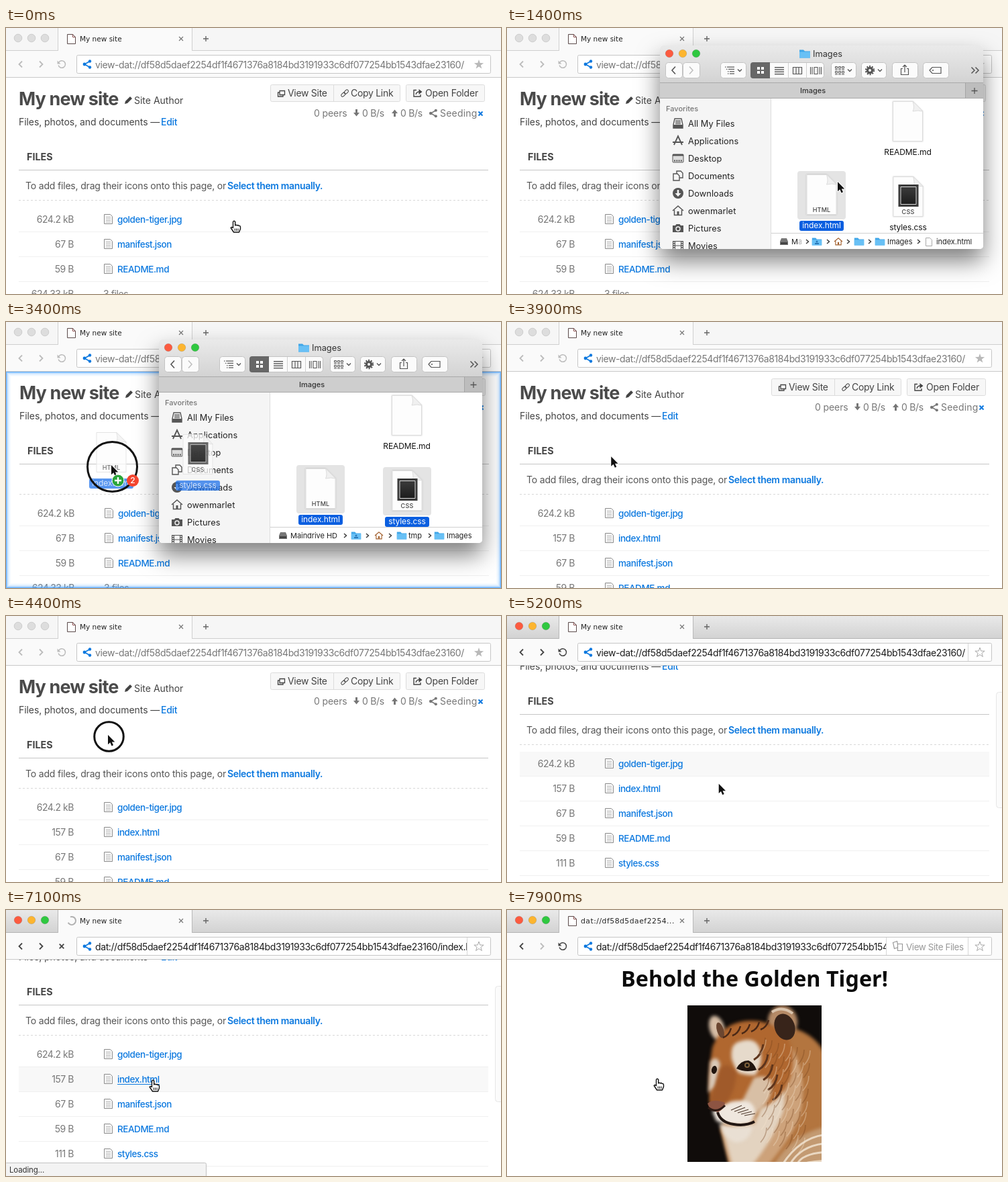
An HTML page with a canvas for the animation above (8 s loop, 738 by 396 pixels).

```html
<!DOCTYPE html>
<html lang="en">
<head>
<meta charset="utf-8">
<title>My new site</title>
<style>
html, body { margin: 0; width: 100%; height: 100%; overflow: hidden; background: #fff; }
canvas { display: block; width: 738px; height: 396px; }
</style>
</head>
<body>
<canvas id="stage"></canvas>
<script>
const W = 738, H = 396, LOOP = 8000, STEP = 100;
const canvas = document.getElementById('stage');
const dpr = window.devicePixelRatio || 1;
canvas.width = W * dpr;
canvas.height = H * dpr;
const c = canvas.getContext('2d');

const UI = 'Inter, "Noto Sans", sans-serif';
const TAB = '"DejaVu Sans", sans-serif';
const BLUE = '#0b78df';
const HASH = 'df58d5daef2254df1f4671376a8184bd3191933c6df077254bb1543dfae23160';

// ---------- helpers ----------
function text(s, x, y, size, color, o = {}) {
  c.font = `${o.weight || 400} ${size}px ${o.family || UI}`;
  c.letterSpacing = (o.track || 0) + 'px';
  c.textAlign = o.align || 'left';
  c.fillStyle = color;
  c.fillText(s, x, y);
}
function rect(x, y, w, h, fill) { c.fillStyle = fill; c.fillRect(x, y, w, h); }
function round(x, y, w, h, r, fill, stroke) {
  c.beginPath();
  c.roundRect(x, y, w, h, r);
  if (fill) { c.fillStyle = fill; c.fill(); }
  if (stroke) { c.strokeStyle = stroke; c.lineWidth = 1; c.stroke(); }
}
function path(d, fill, stroke, width = 1) {
  const p = new Path2D(d);
  if (fill) { c.fillStyle = fill; c.fill(p); }
  if (stroke) { c.strokeStyle = stroke; c.lineWidth = width; c.stroke(p); }
}
function dot(x, y, r, fill, stroke, width = 1) {
  c.beginPath();
  c.arc(x, y, r, 0, 7);
  if (fill) { c.fillStyle = fill; c.fill(); }
  if (stroke) { c.strokeStyle = stroke; c.lineWidth = width; c.stroke(); }
}
function oval(x, y, rx, ry, turn, fill) {
  c.beginPath();
  c.ellipse(x, y, rx, ry, turn, 0, 7);
  c.fillStyle = fill;
  c.fill();
}
function shade(y0, y1, a, b) {
  const g = c.createLinearGradient(0, y0, 0, y1);
  g.addColorStop(0, a);
  g.addColorStop(1, b);
  return g;
}
function at(x, y, draw) { c.save(); c.translate(x, y); draw(); c.restore(); }
function clip(x, y, w, h, draw) {
  c.save();
  c.beginPath();
  c.rect(x, y, w, h);
  c.clip();
  draw();
  c.restore();
}
const clamp = v => Math.max(0, Math.min(1, v));
const ease = v => (v = clamp(v)) * v * (3 - 2 * v);
const span = (t, a, b) => ease((t - a) / (b - a));

// ---------- motion ----------
const track = [
  [200, 340, 287], [600, 440, 215], [1000, 493, 229], [1400, 493, 229], [1900, 604, 255],
  [2100, 604, 255], [2400, 469, 267], [2500, 469, 267], [3200, 157, 213], [3700, 157, 213],
  [4200, 152, 177], [4800, 152, 177], [5500, 422, 297], [5700, 422, 297],
  [6300, 219, 253], [7500, 219, 253], [7800, 224, 251]
];
const presses = [[1000, 1200], [1900, 2100], [2400, 3600], [4300, 4600], [6500, 6700]];

function pointer(t) {
  let a = track[0];
  for (const b of track) {
    if (t < b[0]) {
      const k = b === a ? 0 : span(t, a[0], b[0]);
      return [a[1] + (b[1] - a[1]) * k, a[2] + (b[2] - a[2]) * k];
    }
    a = b;
  }
  return [a[1], a[2]];
}
function ringSize(t) {
  let r = 0;
  for (const [a, b] of presses) {
    if (t >= a && t < b + 170) r = 37 * Math.min(clamp((t - a) / 170), 1 - clamp((t - b) / 170));
  }
  return r;
}
const dropping = t => t >= 2800 && t < 3700;

// ---------- small icons ----------
function share(x, y, color, k = 1) {
  at(x, y, () => {
    c.scale(k, k);
    path('M4 -4.5L-4 0L4 4.5', null, color, 1.6);
    dot(-4, 0, 2.4, color); dot(4, -4.5, 2.2, color); dot(4, 4.5, 2.2, color);
  });
}
function lights(x, y, on) {
  const colors = on ? ['#fc5b40', '#fdb52f', '#2fc840'] : ['#dddddd', '#dddddd', '#dddddd'];
  colors.forEach((k, i) => dot(x + i * 20, y, 5.8, k, on ? 'rgba(0,0,0,.12)' : '#cdcdcd'));
}
function star(x, y, fill, stroke) {
  c.beginPath();
  for (let i = 0; i < 10; i++) {
    const r = i % 2 ? 3 : 7.5, a = i * Math.PI / 5 - Math.PI / 2;
    c.lineTo(x + r * Math.cos(a), y + r * Math.sin(a));
  }
  c.closePath();
  if (fill) { c.fillStyle = fill; c.fill(); }
  if (stroke) { c.strokeStyle = stroke; c.lineWidth = 1; c.stroke(); }
}
function cross(x, y, r, color, w) {
  path(`M${x - r} ${y - r}l${2 * r} ${2 * r}m0 ${-2 * r}l${-2 * r} ${2 * r}`, null, color, w);
}
function plus(x, y, r, color, w) {
  path(`M${x - r} ${y}h${2 * r}M${x} ${y - r}v${2 * r}`, null, color, w);
}
function folder(x, y, k = 1) {
  at(x, y, () => {
    c.scale(k, k);
    path('M-8 -6h6l2 2h8v10h-16z', '#3fa6e8');
    rect(-8, -3, 16, 9, '#68c0f5');
  });
}
function house(x, y, color) {
  path(`M${x - 8} ${y}l8 -7l8 7M${x - 5.5} ${y - 1}v7.5h11v-7.5`, null, color, 1.5);
  rect(x - 1.5, y + 1, 3, 5, color);
}
function sheet(x, y) {
  path(`M${x + .5} ${y + .5}h9l3 3v11h-12z`, '#f6f6f6', '#8d8d8d');
  for (let i = 0; i < 4; i++) rect(x + 3, y + 4 + i * 2.5, 7, 1, '#bdbdbd');
}

// ---------- browser ----------
function chrome(t) {
  const on = t >= 4500, busy = t >= 6800 && t < 7500, done = t >= 7500;
  const ink = on ? '#444' : '#bcbcbc';
  rect(0, 0, W, 34, on ? shade(0, 34, '#e9e9e9', '#d2d2d2') : '#f6f6f6');
  rect(0, 33, W, 1, on ? '#b4b4b4' : '#cfcfcf');
  rect(77, 0, 201, 34, on ? '#b9b9b9' : '#d0d0d0');
  rect(78, 0, 199, 34, '#fafafa');
  rect(0, 34, W, 39, '#fafafa');
  rect(0, 73, W, 1, '#c9c9c9');
  lights(18, 15, on);
  if (busy) {
    const a = t / 130;
    c.beginPath();
    c.arc(98, 16, 6, a, a + 4.6);
    c.strokeStyle = '#b0b0b0';
    c.lineWidth = 2;
    c.stroke();
  } else {
    path('M91.5 9.5h8l4 4v10h-12z', '#fff', '#5b4a4a');
    path('M99.5 9.5v4h4', null, '#8b4c4c');
  }
  if (done) text('dat://df58d5daef2254...', 110, 20, 10.8, '#222', { family: TAB, track: .5 });
  else text('My new site', 110, 20, 10.5, '#222', { family: TAB });
  cross(261, 16, 3, '#777', 1.2);
  plus(298, 16, 4, '#666', 1.4);

  path('M24 49.5l-4.5 4.5l4.5 4.5', null, ink, 1.8);
  path('M50 49.5l4.5 4.5l-4.5 4.5', null, done ? '#bcbcbc' : ink, 1.8);
  if (busy) cross(83, 54, 3.3, '#444', 1.8);
  else {
    path('M78.5 51.5a5.3 5.3 0 1 1 -.4 4', null, ink, 1.5);
    path('M76.5 48.5v5h5z', ink);
  }
  round(105.5, 40.5, 617, 27, 2, '#fff', '#c6c6c6');
  share(121, 54, BLUE);
  const url = t < 6800 ? `view-dat://${HASH}/` : `dat://${HASH}/index.html`;
  clip(130, 42, (done ? 565 : 687) - 130, 24, () =>
    text(url, 133, 60, 14, on ? '#1d1d1d' : '#777', { track: -.4 }));
  if (on) rect(687, 41, 1, 26, '#d6d6d6');
  star(705, 54.5, on ? null : '#b9b9b9', on ? '#a9a9a9' : null);
  if (done) {
    rect(565, 41, 1, 26, '#d6d6d6');
    path('M575.5 48.5l6 -2l2 9l-6 2z', '#fff', '#999', 1.2);
    path('M582.5 50.5h7v10h-7z', '#fff', '#999', 1.2);
    text('View Site Files', 595, 60, 13.5, '#9a9a9a', { track: -.45 });
  }
}

function header() {
  const ui = { track: -.3 };
  text('My new site', 19, 115, 27, '#4a4a4a', { weight: 700, track: -.87 });
  path('M177 113l1 -4l7 -7l3 3l-7 7z', '#444');
  text('Site Author', 191, 113, 14, '#444');
  text('Files, photos, and documents —', 19, 145, 14, '#444', { track: -.07 });
  text('Edit', 231, 145, 14, BLUE, { weight: 500, track: -.3 });
  round(394.5, 84.5, 193, 25, 2, '#f7f7f7', '#dcdcdc');
  rect(488, 85, 1, 25, '#dcdcdc');
  round(596.5, 84.5, 117, 25, 2, '#f7f7f7', '#dcdcdc');
  path('M408 93.5h7.5v6h-7.5zM408 96h-2.5v6h7.5v-2.5', null, '#444', 1.3);
  text('View Site', 420, 102, 14, '#444', ui);
  at(505, 97, () => {
    c.rotate(-.75);
    round(-6.5, -2, 7, 4.2, 2, null, '#444');
    round(-.5, -2, 7, 4.2, 2, null, '#444');
  });
  text('Copy Link', 514, 102, 14, '#444', ui);
  path('M612 92.5h-4v9.5h10v-3M611 99q1 -4 5 -4', null, '#444', 1.4);
  path('M615.5 91l5 4l-5 4z', '#444');
  text('Open Folder', 625, 102, 14, '#444', { track: -.2 });
  const gray = '#777';
  text('0 peers', 459, 132, 14, gray, { track: -.1 });
  path('M521 121h3v5h3l-4.5 5.5l-4.5 -5.5h3z', gray);
  text('0 B/s', 531, 132, 14, gray, ui);
  path('M578 132h3v-5h3l-4.5 -5.5l-4.5 5.5h3z', gray);
  text('0 B/s', 588, 132, 14, gray, ui);
  share(637, 127, gray, .95);
  text('Seeding', 647, 132, 14, gray, { track: .2 });
  cross(707.5, 127.5, 3, BLUE, 2);
}

function glow() {
  for (let i = 0; i < 7; i++) {
    c.strokeStyle = `rgba(64,158,255,${.8 * Math.pow(.62, i)})`;
    c.lineWidth = 1;
    c.strokeRect(i + .5, 74.5 + i, W - 1 - 2 * i, H - 75 - 2 * i);
  }
}

function listing(t) {
  const all = [['624.2 kB', 'golden-tiger.jpg'], ['157 B', 'index.html'], ['67 B', 'manifest.json'],
    ['59 B', 'README.md'], ['111 B', 'styles.css']];
  const files = t < 3800 ? all.filter(f => !/index|styles/.test(f[1])) : all;
  const scroll = 70 * span(t, 4700, 5300);
  const y = pointer(t)[1];
  let hover = -1;
  if (t >= 5200) hover = t < 5700 ? 0 : Math.floor((y + scroll - 267) / 37);
  at(dropping(t) ? 1 : 0, -Math.round(scroll), () => {
    header();
    text('FILES', 31, 197, 14.3, '#444', { weight: 700 });
    rect(19, 211, 700, 1, '#c6c6c6');
    if (!dropping(t)) {
      text('To add files, drag their icons onto this page, or', 29, 240, 14, '#555', { track: -.18 });
      text('Select them manually.', 330, 240, 14, BLUE, { weight: 600, track: -.34 });
    }
    c.setLineDash([3, 3]);
    path('M19 256.5h700', null, '#d8d8d8');
    c.setLineDash([]);
    files.forEach(([size, name], i) => {
      const top = 267 + i * 37;
      if (i === hover) rect(19, top, 700, 37, '#f8f8f8');
      rect(19, top + 36, 700, 1, '#f0f0f0');
      text(size, 101, top + 23, 14, '#777', { align: 'right', track: -.45 });
      sheet(146, top + 10);
      text(name, 166, top + 23, 13.5, BLUE, { weight: 500, track: -.45 });
      if (i === hover && name === 'index.html' && t >= 6200) rect(166, top + 25, 63, 1, BLUE);
    });
    const end = 267 + files.length * 37 + 23;
    text(t < 3800 ? '624.33 kB' : '624.59 kB', 101, end, 14, '#777', { align: 'right', track: -.45 });
    text(files.length + ' files', 145, end, 14, '#777', { track: -.4 });
  });
  if (t >= 4500) round(729.5, 113.5, 12, 172, 4, '#fbfbfb', '#e6e6e6');
  if (dropping(t)) glow();
  if (t >= 6800) {
    round(-1.5, 376.5, 300, 22, 2, '#f3f3f3', '#c2c2c2');
    text('Loading...', 5, 391, 11.5, '#333', { track: -.15 });
  }
}

// Soft colour masses, then sharper features and fur strokes on top.
function tiger() {
  clip(269, 142, 200, 233, () => {
    rect(269, 142, 200, 233, '#100c0a');
    c.filter = 'blur(2.5px)';
    path('M425 175Q469 188 480 230V390H332Q328 350 318 328L360 200Z', '#b3753f');
    path('M425 205Q450 250 436 310Q420 345 385 385H335Q322 350 320 325L400 300Z', '#cda27a');
    path('M388 262Q420 250 412 300Q395 345 365 380H336Q328 350 322 328L370 318Z', '#e3d3c0');
    path('M480 322Q420 332 392 390H480Z', '#c39a72');
    oval(313, 176, 11, 19, -.3, '#d6bda5');
    oval(411, 166, 22, 24, -.2, '#b58a66');
    path('M306 205Q318 172 350 166Q385 160 412 182Q432 205 424 245Q415 275 390 290L340 305L303 290Q298 250 306 205Z', '#b0672f');
    path('M335 222Q332 200 346 196Q368 188 376 204Q384 226 370 246Q350 246 342 240Z', '#e6dacb');
    path('M303 226Q313 214 318 230L312 262L300 272Z', '#d9c9b8');
    path('M368 250Q392 242 396 262Q392 292 366 306L345 296Z', '#d8bfa5');
    path('M306 300Q334 278 362 286Q378 300 362 318Q335 324 312 314Z', '#efe7de');
    path('M316 318Q340 326 366 322Q362 346 340 346Q324 340 316 318Z', '#e9dfd3');
    path('M317 238Q328 222 342 242Q340 272 326 288L302 286Z', '#a05a2a');
    c.filter = 'blur(.7px)';
    oval(318, 179, 5, 12, -.3, '#6b4630');
    oval(414, 174, 15, 20, -.35, '#38241a');
    path('M395 152Q410 142 426 154', null, '#d9c3ac', 4);
    path('M299 288Q308 280 325 287Q324 297 314 301Q302 299 299 288Z', '#8d5442');
    path('M300 294Q312 304 325 291', null, '#2c1913', 3);
    path('M314 301Q318 316 338 319Q356 322 369 315', null, '#211612', 4);
    path('M342 236Q348 224 360 224Q368 227 372 238Q356 243 342 236Z', '#21150f');
    dot(358, 231, 4, '#80613a');
    dot(358, 231, 2, '#111');
    oval(309, 238, 4, 6, .2, '#21150f');
    for (let i = 0; i < 5; i++) {
      path(`M${322 + i * 14} ${190 - i * 3}q9 -3 12 -14`, null, '#4a2816', 2.5);
      path(`M${382 + i * 7} ${200 + i * 15}q-2 16 -14 23`, null, '#5d341c', 3);
      path(`M${334 + i * 5} ${298 + i * 2}l16 ${-7 + i}`, null, '#4f3a2d', 1.2);
      path(`M480 ${334 + i * 13}Q438 ${336 + i * 13} ${410 + i * 11} 380`, null, '#ead8c2', 3);
    }
    for (let i = 0; i < 60; i++) {
      const x = 385 + (i * 37 % 68), y = 190 + (i * 29 % 150);
      path(`M${x} ${y}q0 12 -9 22`, null, i % 2 ? 'rgba(245,228,206,.35)' : 'rgba(115,62,25,.35)', 1.6);
    }
    c.filter = 'none';
  });
}

function site() {
  text('Behold the Golden Tiger!', 369, 114, 32.3, '#0b0b0b',
    { weight: 700, family: '"Noto Sans", "Open Sans", sans-serif', align: 'center' });
  tiger();
}

// ---------- file window ----------
function bigSheet(x, y, label, ghost) {
  at(x, y, () => {
    if (!ghost) {
      c.shadowColor = 'rgba(0,0,0,.25)';
      c.shadowBlur = 2;
    }
    path('M0 0h30l15 15v45h-45z', '#fdfdfd');
    c.shadowColor = 'transparent';
    path('M.5 .5h29.5l14.5 14.5v44.5h-44z', null, '#dcdcdc');
    path('M30 0q3 10 0 15q8 -2 15 0z', '#f0f0f0', '#dcdcdc');
    if (label === 'CSS') {
      rect(8, 12, 30, 33, '#3a3a3a');
      round(11.5, 15.5, 23, 26, 0, shade(15, 42, '#3c3c3c', '#1c1c1c'), '#d8d8d8');
    }
    if (label) text(label, 22.5, 56, 9, '#444', { align: 'center', weight: 500, track: .2 });
  });
}
function fileItem(x, y, name, kind, on, ghost) {
  if (on && !ghost) round(x - 36, y - 5, 72, 72, 4, '#e4e4e4');
  bigSheet(x - 22.5, y, kind, ghost);
  const w = name.length * 6.3 + 3;
  if (on) round(x - w / 2, y + 69, w, 15, 3, ghost ? '#1f72ea' : '#0b5fe0');
  text(name, x, y + 80, 12, on ? '#fff' : '#111', { align: 'center', track: -.1 });
}
function picked(ghost, t) {
  fileItem(469, 218, 'index.html', 'HTML', t >= 1100, ghost);
  fileItem(598, 221, 'styles.css', 'CSS', t >= 2000, ghost);
}

function toolbar() {
  const ink = '#555';
  [[236, 25], [262, 25], [318, 38], [363, 109], [483, 37], [528, 37], [574, 38], [620, 38]].forEach(([x, w]) =>
    round(x + .5, 51.5, w, 23, 4, '#fbfbfb', '#c3c3c3'));
  path('M251 57.5l-5 5.5l5 5.5', null, ink, 1.6);
  path('M272 57.5l5 5.5l-5 5.5', null, '#c0c0c0', 1.6);
  for (let i = 0; i < 4; i++) {
    const inset = Math.min(i, 2) * 2;
    rect(325 + inset, 57.5 + i * 3.3, 1.5, 1.2, ink);
    rect(328 + inset, 57.5 + i * 3.3, 11 - inset, 1.2, ink);
  }
  [347, 511, 556].forEach(x => path(`M${x - 3} 61.5l3 3l3 -3`, null, ink, 1.4));
  round(363, 51, 29, 24, [4, 0, 0, 4], '#676767');
  for (let i = 0; i < 4; i++) rect(373 + (i % 2) * 6, 58 + (i >> 1) * 6, 4, 4, '#fff');
  for (let i = 0; i < 4; i++) rect(399, 58 + i * 3.3, 14, 1.4, ink);
  path('M426.5 58.5h13v10h-13zM431 58.5v10M435 58.5v10', null, ink, 1.2);
  path('M452.5 58v11M455 58v11M458 58.5h5v10h-5zM466 58v11M468.5 58v11', null, ink, 1.1);
  rect(419, 52, 1, 23, '#d0d0d0');
  rect(446, 52, 1, 23, '#d0d0d0');
  for (let i = 0; i < 6; i++) {
    const x = 489 + (i % 3) * 5, y = 57 + (i > 2) * 7;
    round(x + .5, y + .5, 3, 2.5, 0, null, ink);
    rect(x, y + 4.5, 4, 1, ink);
  }
  c.setLineDash([2, 1.8]);
  dot(541, 63, 6, null, ink, 2.4);
  c.setLineDash([]);
  dot(541, 63, 3.6, null, ink, 3.2);
  path('M590 60.5h-2.5v9h11v-9h-2.5M593 66v-10.5M590 58l3 -3l3 3', null, ink, 1.2);
  path('M630 63l4 -4.5h13v9h-13z', null, ink, 1.2);
  dot(635, 63, 1, ink);
  path('M692.5 58.5l4.5 4.5l-4.5 4.5M698.5 58.5l4.5 4.5l-4.5 4.5', null, ink, 1.5);
}

const places = ['All My Files', 'Applications', 'Desktop', 'Documents', 'Downloads', 'owenmarlet', 'Pictures', 'Movies'];
const marks = [
  () => { path('M-5 -7h10l2 9v5h-14v-5z', null, '#555', 1.4); rect(-7, 2, 14, 5, '#555');
    for (let i = 0; i < 3; i++) rect(-4, -4.5 + i * 2.2, 8, 1.2, '#555'); },
  () => path('M-6 6L0 -7L6 6M-8 2H8', null, '#555', 1.8),
  () => { round(-8, -6, 16, 12, 1, '#ddd', '#555'); rect(-8, -6, 16, 2.5, '#555');
    for (let i = 0; i < 4; i++) rect(-6 + i * 3.3, 2.5, 2, 2, '#555'); },
  () => path('M-7 -3h6l3 3v7h-9zM-2 -3v-4h6l3 3v7h-5', null, '#555', 1.4),
  () => { dot(0, 0, 8, '#555'); path('M-1.3 -5h2.6v5h3.2l-4.5 5l-4.5 -5h3.2z', '#f5f5f5'); },
  () => house(0, 0, '#555'),
  () => { path('M-8 -4h4l1.5 -2h5l1.5 2h4v10h-16z', '#555'); dot(0, 1, 3, null, '#f5f5f5', 1.4); },
  () => { rect(-8, -7, 16, 14, '#555'); rect(-4, -6, 8, 5.5, '#f5f5f5'); rect(-4, .5, 8, 5.5, '#f5f5f5');
    for (let i = 0; i < 4; i++) { rect(-7, -5.5 + i * 3, 2, 1.5, '#f5f5f5'); rect(5, -5.5 + i * 3, 2, 1.5, '#f5f5f5'); } }
];

function trail(t) {
  const one = t >= 1100 && t < 2000, y = 318, small = { track: -.05 };
  const label = (s, x) => text(s, x, 322, 11, '#222', small);
  const next = x => path(`M${x - 2} ${y - 3}l3.5 3l-3.5 3`, null, '#333', 1.4);
  path(`M409 ${y - 5}h8l2 5v5h-12v-5z`, '#777');
  rect(408, y + 1, 10, 3, '#444');
  if (one) {
    clip(420, 306, 19, 22, () => label('Maindrive HD', 424));
    rect(434, 308, 5, 18, 'rgba(255,255,255,.6)');
  } else label('Maindrive HD', 424);
  const [a, b, d] = one ? [462, 494, 525] : [522, 556, 590];
  folder(a, y, .9);
  dot(a, y, 1.5, '#2a78b8');
  rect(a - 3, y + 2, 6, 2, '#2a78b8');
  at(b, y, () => { c.scale(.75, .75); house(0, 0, '#a2602e'); });
  folder(d, y, .9);
  (one ? [448, 479, 509, 541, 614] : [506, 539, 573, 632]).forEach(next);
  if (one) {
    folder(556, y, .9);
    label('Images', 567);
    path('M624.5 312.5h6l3 3v9h-9z', '#fff', '#aaa');
    label('index.html', 640);
  } else {
    label('tmp', 600);
    folder(646, y, .9);
    label('Images', 657);
  }
}

function fileWindow(t) {
  c.save();
  c.shadowColor = 'rgba(0,0,0,.5)';
  c.shadowBlur = 34 * dpr;
  c.shadowOffsetY = 18 * dpr;
  round(228, 26, 482, 303, 5, '#fff');
  c.restore();
  c.save();
  c.beginPath();
  c.roundRect(228, 26, 482, 303, 5);
  c.clip();
  rect(228, 26, 482, 55, shade(26, 81, '#eaeaea', '#d3d3d3'));
  rect(228, 81, 482, 24, '#cecece');
  rect(684, 81, 26, 24, '#bdbdbd');
  rect(228, 81, 482, 1, '#aaa');
  rect(228, 104, 482, 1, '#aaa');
  rect(683, 81, 1, 24, '#a5a5a5');
  rect(228, 105, 165, 224, '#f5f5f5');
  rect(393, 105, 1, 224, '#dcdcdc');
  lights(242, 38, true);
  folder(444, 38.5);
  text('Images', 456, 43, 12.8, '#333');
  toolbar();
  text('Images', 456, 97, 11, '#333', { align: 'center', weight: 500 });
  plus(697, 93.5, 4.5, '#555', 1.3);
  text('Favorites', 237, 124, 11, '#777', { weight: 500 });
  places.forEach((name, i) => {
    at(255, 142 + i * 26, marks[i]);
    text(name, 270, 147 + i * 26, 12.8, '#222', { track: .05 });
  });
  fileItem(597.5, 109, 'README.md', '', false);
  picked(false, t);
  rect(394, 305, 316, 24, '#fff');
  rect(394, 305, 316, 1, '#d0d0d0');
  trail(t);
  c.restore();
}

// ---------- pointer ----------
function cursor(t) {
  const [x, y] = pointer(t), r = ringSize(t);
  if (t >= 2500 && t < 3600) {
    c.globalAlpha = .75;
    at(x - 469, y - 267, () => picked(true, t));
    c.globalAlpha = 1;
  }
  if (r > 1) dot(x + 1.5, y + 2.5, r, null, '#111', 3);
  at(x, y, () => {
    c.lineJoin = 'round';
    if (t < 300 || t >= 6200) {
      path('M-1.5 1.5Q0 -1 1.7 1.5V7Q3 5.3 4.5 7Q6 5.7 7.2 7.6Q9.5 6.8 9.5 9.5V12L7.5 17H-.5L-4.8 10.5Q-4.2 8.5 -1.5 10.5Z', '#fff', '#111', 1.4);
      path('M1.2 11.5v3.5M3.6 11.5v3.5M6 11.5v3.5', null, '#111', 1);
    } else {
      const d = 'M0 0V14.3L3.3 11.3L5.6 16.4L8 15.3L5.8 10.4H10.3Z';
      path(d, null, '#fff', 2);
      path(d, '#111');
    }
    c.lineJoin = 'miter';
  });
  if (t >= 2800 && t < 3600) {
    dot(x + 32, y + 23, 9, '#f4452f');
    text('2', x + 32, y + 27, 12, '#fff', { align: 'center', weight: 500 });
    dot(x + 10, y + 23, 9, '#2aa53a', '#fff');
    plus(x + 10, y + 23, 5, '#fff', 2.4);
  }
}

function draw(t) {
  c.setTransform(dpr, 0, 0, dpr, 0, 0);
  rect(0, 0, W, H, '#fff');
  clip(0, 74, W, H - 74, () => t < 7500 ? listing(t) : site());
  chrome(t);
  if (t >= 400 && t < 3900) fileWindow(t);
  cursor(t);
}
function tick() {
  draw(Math.floor(performance.now() % LOOP / STEP) * STEP);
  requestAnimationFrame(tick);
}
tick();
</script>
</body>
</html>
```
